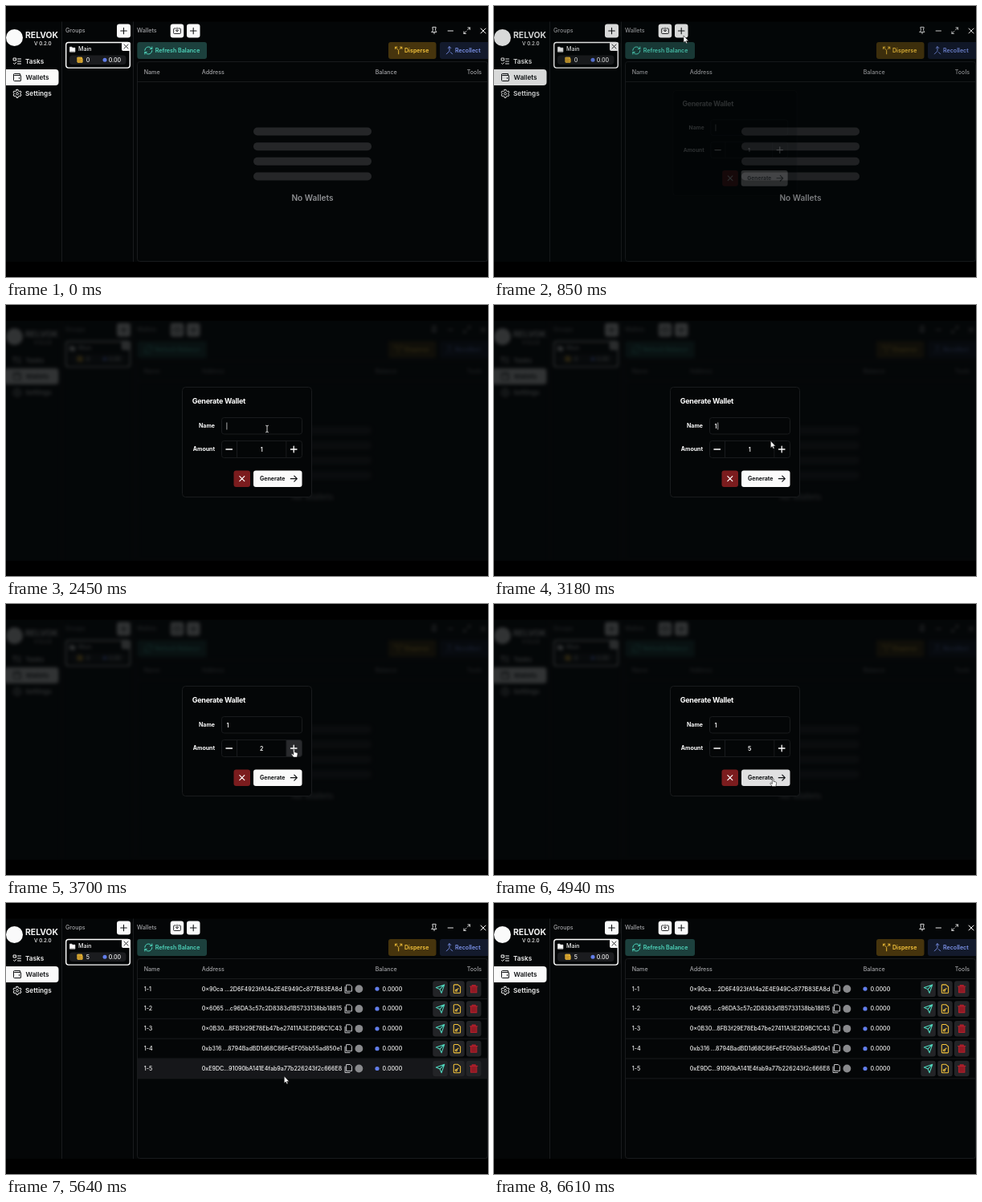
An HTML page that plays this animation: 600x338 px, repeating every 6.64 s.

```html
<!DOCTYPE html>
<html lang="en">
<head>
<meta charset="utf-8">
<title>Generate wallets</title>
<style>
html, body { margin: 0; width: 100%; height: 100%; overflow: hidden; background: #000; }
svg { display: block; width: 600px; height: 338px; }
text { font: 500 7.1px Inter, "Liberation Sans", sans-serif; fill: #f2f2f2; white-space: pre; }
text.b { font-weight: 600; }
text.nav { font-weight: 600; font-size: 8.2px; }
text.dim { fill: #a2a3a6; }
text.end { text-anchor: end; }
text.mid { text-anchor: middle; }
#dialog text { font-weight: 600; fill: #fff; }
#dialog text.b { font-weight: 700; font-size: 7px; }
.line { stroke: #191b1d; fill: none; }
</style>
</head>
<body>
<svg id="stage" viewBox="0 0 600 338"></svg>
<script>
const LOOP = 6640, OPEN = 800, CLOSE = 5080, FADE = 200;
const BG = '#040607', SHADE = '#060809', DARK = '#101214', WHITE = '#fafafa';
const TEAL = '#4fd6bd', GOLD = '#f8c63c', BLUE = '#7c93ea', COIN = '#627eea';

const icons = {
  plus: 'M5 12h14M12 5v14',
  minus: 'M5 12h14',
  x: 'M18 6 6 18M6 6l12 12',
  arrow: 'M4 12h16M13 5l7 7-7 7',
  refresh: 'M3 12a9 9 0 0 1 9-9 9.75 9.75 0 0 1 6.74 2.74L21 8M21 3v5h-5M21 12a9 9 0 0 1-9 9 9.75 9.75 0 0 1-6.74-2.74L3 16M8 16H3v5',
  tasks: 'M3 4h6v6H3zM3 17l2 2 4-4M13 6h8M13 12h8M13 18h8',
  wallet: 'M19 7V3H5a2 2 0 0 0 0 4h15a1 1 0 0 1 1 1v12a1 1 0 0 1-1 1H5a2 2 0 0 1-2-2V5M17 13v2',
  gear: 'M10 2h4l.6 3L17 6.4l3-1 2 3.4-2.3 2.1v2.2l2.3 2.1-2 3.4-3-1-2.4 1.4-.6 3h-4l-.6-3L7 17.6l-3 1-2-3.4 2.3-2.1v-2.2L2 8.8l2-3.4 3 1L9.4 5zM12 9a3 3 0 1 0 .01 0',
  folder: 'M3 20V4h7l2 3h9v13z',
  pin: 'M12 17v5M5 17h14l-3-5V6h1V2H7v4h1v6z',
  expand: 'M15 3h6v6M9 21H3v-6M21 3l-7 7M3 21l7-7',
  load: 'M12 3v10M8 10l4 4 4-4M8 5H4a2 2 0 0 0-2 2v11a2 2 0 0 0 2 2h16a2 2 0 0 0 2-2V7a2 2 0 0 0-2-2h-4',
  split: 'M16 3h5v5M8 3H3v5M12 22v-8.3a4 4 0 0 0-1.17-2.87L3 3M15 9l6-6',
  merge: 'M8 6l4-4 4 4M12 2v10.3a4 4 0 0 1-1.17 2.87L4 22M20 22l-5-5',
  copy: 'M8 2h9l4 4v12H8zM4 7v15h12',
  send: 'M22 2l-7 20-4-9-9-4zM22 2 11 13',
  key: 'M14 2H6a2 2 0 0 0-2 2v16a2 2 0 0 0 2 2h12a2 2 0 0 0 2-2V7zM10 14a2 2 0 1 0 .1 0M11.5 14.5 15 11',
  trash: 'M3 6h18M8 6V3h8v3M5 6v15h14V6z'
};

const icon = (name, cx, cy, size, color, fill = 'none', width = 2) =>
  `<path d="${icons[name]}" transform="translate(${cx - size / 2} ${cy - size / 2}) scale(${size / 24})"
    fill="${fill}" stroke="${color}" stroke-width="${width}" stroke-linecap="round" stroke-linejoin="round"/>`;
const box = (x, y, w, h, r, fill, more = '') =>
  `<rect x="${x}" y="${y}" width="${w}" height="${h}" rx="${r}" fill="${fill}" ${more}/>`;
const text = (x, y, s, cls = '', more = '') => `<text x="${x}" y="${y}" class="${cls}" ${more}>${s}</text>`;
const line = d => `<path class="line" d="${d}"/>`;
const dot = (x, y, r, fill) => `<circle cx="${x}" cy="${y}" r="${r}" fill="${fill}"/>`;

const sidebar = () =>
  dot(10.5, 39.5, 10.5, WHITE) +
  text(24, 39.5, 'RELVOK', '', 'style="font-size:10.4px;font-weight:700"') +
  text(35, 49, 'V 0.2.0', '', 'style="font-size:6.3px"') +
  icon('tasks', 14, 69, 12, WHITE) + text(24, 71.8, 'Tasks', 'nav') +
  box(-4, 79, 69.5, 20, 4, WHITE) +
  icon('wallet', 14, 89, 12, DARK) + text(24.5, 91.9, 'Wallets', 'nav', `style="fill:${DARK}"`) +
  icon('gear', 14, 109.3, 12, WHITE) + text(24, 112.2, 'Settings', 'nav') +
  line('M69.5 19V319M158.5 19V319');

const groups = () =>
  text(74, 33.4, 'Groups', 'dim') +
  box(138, 22.5, 17, 17, 3, WHITE) + icon('plus', 146.5, 31, 13, DARK) +
  box(74.7, 45.5, 79.6, 31.6, 3, BG, 'stroke="#fff" stroke-width="1.4"') +
  icon('folder', 82.7, 54, 8.5, WHITE, WHITE) + text(90, 56.4, 'Main') +
  box(144, 45, 11, 11, 2, WHITE) + icon('x', 149.5, 50.5, 10, DARK) +
  box(79, 61.5, 70.5, 11.5, 4, '#1b1c1f') +
  icon('wallet', 92, 67.2, 8.5, GOLD, '#c9962a') + text(99.7, 69.6, '0', '', 'id="count"') +
  dot(123, 67.2, 2.5, COIN) + text(127.7, 69.6, '0.00');

const toolbar = () =>
  text(163, 33.4, 'Wallets', 'dim') +
  box(204.7, 22.5, 16.5, 17, 3, WHITE) + icon('load', 213, 31, 10.5, DARK) +
  box(225, 22.5, 16.5, 17, 3, WHITE, 'id="add"') + icon('plus', 233.2, 31, 13, DARK) +
  icon('pin', 533, 30.5, 10, WHITE) + icon('minus', 553.3, 31, 11, WHITE) +
  icon('expand', 573.7, 30.7, 10, WHITE) + icon('x', 594, 31, 12, WHITE) +
  box(163.3, 45, 86.7, 21, 3, '#1c403d') + icon('refresh', 177.3, 55.5, 12, TEAL) +
  text(185.7, 58.1, 'Refresh Balance', 'b', `style="fill:${TEAL}"`) +
  box(476, 45, 59.5, 21, 3, '#46340d') + icon('split', 488.7, 55.3, 11, GOLD) +
  text(496, 58.1, 'Disperse', 'b', `style="fill:${GOLD}"`) +
  box(540, 45, 64, 21, 3, '#131a2c') + icon('merge', 552, 55.3, 11, BLUE) +
  text(559, 58.1, 'Recollect', 'b', `style="fill:${BLUE}"`);

const table = () =>
  box(163.5, 69.5, 436, 249, 3, 'none', 'class="line"') + line('M164 94.5H600') +
  text(171.7, 84.9, 'Name', 'dim') + text(243.7, 84.9, 'Address', 'dim') +
  text(459.7, 84.9, 'Balance', 'dim') + text(592, 84.9, 'Tools', 'dim end');

const empty = () =>
  [0, 1, 2, 3].map(i => box(308, 151.5 + i * 18.65, 147, 10, 5, '#252628')).join('') +
  text(381.5, 242.6, 'No Wallets', 'b mid', 'style="font-size:10.1px;fill:#8f9093"');

const wallets = [
  ['0×90ca', '...2D6F4923fA14a2E4E949Cc877B83EA8d'],
  ['0×6065', '...c96DA3c57c2D8383d1B5733138bb18815'],
  ['0×0B30', '...8FB3f29E78Eb47be27411A3E2D9BC1C43'],
  ['0xb316', '...8794BadBD1d68C86FeEF05bb55ad850e1'],
  ['0xE9DC', '...91090bA141E4fab9a77b226243f2c666E8']
];
const rowTop = i => 94.7 + i * 24.85;
const row = ([head, tail], i) => {
  const y = rowTop(i), c = y + 12.4, base = c + 2.5;
  const tool = (name, x, color, fill) =>
    box(x, c - 9.8, 18.5, 19.6, 3, '#232427') + icon(name, x + 9.25, c, 12.5, color, fill);
  return box(164, y, 436, 24.85, 0, 'none', 'class="row"') +
    line(`M164 ${y + 24.8}H600`) +
    text(171.7, base, '1-' + (i + 1)) + text(243.7, base, head) + text(418.3, base, tail, 'end') +
    icon('copy', 426, c, 12, '#c4c5c8') + dot(439.4, c, 4.9, '#88898c') +
    dot(462, c, 2.6, COIN) + text(468.6, base, '0.0000') +
    tool('send', 531.3, TEAL) + tool('key', 552.2, GOLD) + tool('trash', 573, '#b3202c', '#8f1a24');
};

const dialog = () =>
  box(219.5, 102.5, 161, 137, 4, BG, 'stroke="#191b1d"') +
  text(231.7, 122.6, 'Generate Wallet', 'b', 'style="font-size:9px;letter-spacing:-.25px"') +
  text(260, 153.4, 'Name', 'b end') + text(260, 182.4, 'Amount', 'b end') +
  box(268.5, 140.5, 100, 20.5, 3, 'none', 'class="line"') +
  text(274.6, 153.5, '1', '', 'id="name"') +
  box(274.5, 146.5, .8, 9, 0, WHITE, 'id="caret"') +
  '<path id="more" d="M349 169.5h16.5a3 3 0 0 1 3 3v15a3 3 0 0 1-3 3H349z"/>' +
  box(268.5, 169.5, 100, 21, 3, 'none', 'class="line"') + line('M287.5 169.5v21M348.8 169.5v21') +
  icon('minus', 277.7, 180, 13, '#fff', 'none', 2.4) + icon('plus', 358.2, 180, 13, '#fff', 'none', 2.4) +
  text(318.2, 182.6, '1', 'mid', 'id="amount"') +
  box(283.5, 206.5, 20.5, 20.5, 3, '#7b1c1e') + icon('x', 293.8, 216.7, 12, '#fff', 'none', 2.4) +
  box(308, 206.5, 60.5, 20.5, 3, WHITE, 'id="go"') +
  text(316, 219.2, 'Generate', 'b', `style="fill:${DARK}"`) +
  icon('arrow', 358.3, 216.7, 12, DARK, 'none', 2.4);

const pointers = `
  <g id="arrow"><path d="M0 0V8.6L2 6.9 3.3 9.8 4.7 9.2 3.4 6.4H6.1Z" fill="#fff" stroke="#111" stroke-width=".5"/></g>
  <g id="hand"><path d="M-.9.6C-.9-.5.8-.5.8.6V3.6L3.7 4.3C4.4 4.5 4.5 5 4.4 5.8L3.7 9.9H-.9L-3.3 6.5C-3.7 5.7-2.8 5.1-2.1 5.7L-.9 6.7Z" transform="translate(.7 .7)" fill="#fff" stroke="#111" stroke-width=".6"/></g>
  <g id="beam"><path d="M-1.8-3.8Q0-3.8 0-2.8Q0-3.8 1.8-3.8M0-3V4M-1.8 4.8Q0 4.8 0 3.8Q0 4.8 1.8 4.8" fill="none" stroke="#e8e8e8" stroke-width=".9"/></g>`;

document.getElementById('stage').innerHTML =
  box(0, 19, 600, 300, 0, BG) +
  `<g id="app">${sidebar()}${groups()}${toolbar()}${table()}
    <g id="empty">${empty()}</g><g id="rows">${wallets.map(row).join('')}</g></g>` +
  box(0, 19, 600, 300, 0, SHADE, 'id="shade"') +
  `<g id="dialog">${dialog()}</g><g id="pointer">${pointers}</g>` +
  box(0, 0, 600, 19.5, 0, '#000') + box(0, 319, 600, 19, 0, '#000');

const $ = id => document.getElementById(id);
const rows = document.querySelectorAll('.row');
const show = (el, on) => el.setAttribute('visibility', on ? 'visible' : 'hidden');
const clamp = v => Math.min(1, Math.max(0, v));
const ease = v => v * v * (3 - 2 * v);

// time, x, y of the pointer tip
const path = [
  [150, -8, 226], [640, 236, 37], [1420, 236, 37], [1980, 322, 152], [2250, 325, 154],
  [2930, 325, 154], [3380, 358, 180.5], [4280, 358, 180.5], [4600, 346.5, 217],
  [5050, 346.5, 217], [5250, 346.3, 216], [6150, 346.3, 216], [6480, 353, 332]
];
const clicks = [3580, 3800, 3980, 4160];

function pointerAt(t) {
  const i = path.findIndex(p => p[0] > t);
  if (i === 0) return path[0].slice(1);
  if (i < 0) return path[path.length - 1].slice(1);
  const [t0, x0, y0] = path[i - 1], [t1, x1, y1] = path[i];
  const k = ease((t - t0) / (t1 - t0));
  return [x0 + (x1 - x0) * k, y0 + (y1 - y0) * k];
}

function draw(t) {
  const [x, y] = pointerAt(t);
  const over = (l, tp, r, b) => x >= l && x <= r && y >= tp && y <= b;
  const modal = t >= OPEN && t < CLOSE;
  const shown = ease(clamp((t - OPEN) / FADE)) * (1 - ease(clamp((t - CLOSE) / FADE)));
  const done = t >= CLOSE + 60;

  $('app').style.filter = shown > 0 ? `blur(${2 * shown}px)` : 'none';
  $('shade').setAttribute('opacity', .82 * shown);
  $('dialog').setAttribute('opacity', shown);
  const s = .95 + .05 * shown;
  $('dialog').setAttribute('transform', `translate(300 171) scale(${s}) translate(-300 -171)`);

  show($('empty'), !done);
  show($('rows'), done);
  $('count').textContent = done ? 5 : 0;
  rows.forEach((r, i) => r.setAttribute('fill',
    done && over(164, rowTop(i), 600, rowTop(i + 1)) ? '#16171a' : 'none'));

  const typed = t >= 2800;
  $('name').setAttribute('opacity', typed ? 1 : 0);
  $('caret').setAttribute('x', typed ? 278.4 : 274.5);
  $('caret').setAttribute('opacity', t < 3580 && (t - OPEN) % 1060 < 620 ? .85 : 0);
  $('amount').textContent = 1 + clicks.filter(c => t >= c).length;

  const onAdd = !modal && over(225, 22, 242, 40);
  const onMore = modal && over(349, 169, 369, 191);
  const onGo = modal && over(308, 206, 369, 227);
  $('add').setAttribute('fill', onAdd ? '#e2e2e3' : WHITE);
  $('more').setAttribute('fill', onMore ? '#292a2d' : 'none');
  $('go').setAttribute('fill', onGo ? '#e0e0e1' : WHITE);

  const onCard = !modal && (over(74, 45, 155, 78) || over(0, 59, 66, 119));
  const kind = modal && over(268, 140, 369, 161) ? 'beam'
    : onAdd || onMore || onGo || onCard ? 'hand' : 'arrow';
  for (const id of ['arrow', 'hand', 'beam']) show($(id), id === kind);
  $('pointer').setAttribute('transform', `translate(${x} ${y})`);
}

const start = performance.now();
function tick() {
  draw((performance.now() - start) % LOOP);
  requestAnimationFrame(tick);
}
tick();
</script>
</body>
</html>
```
